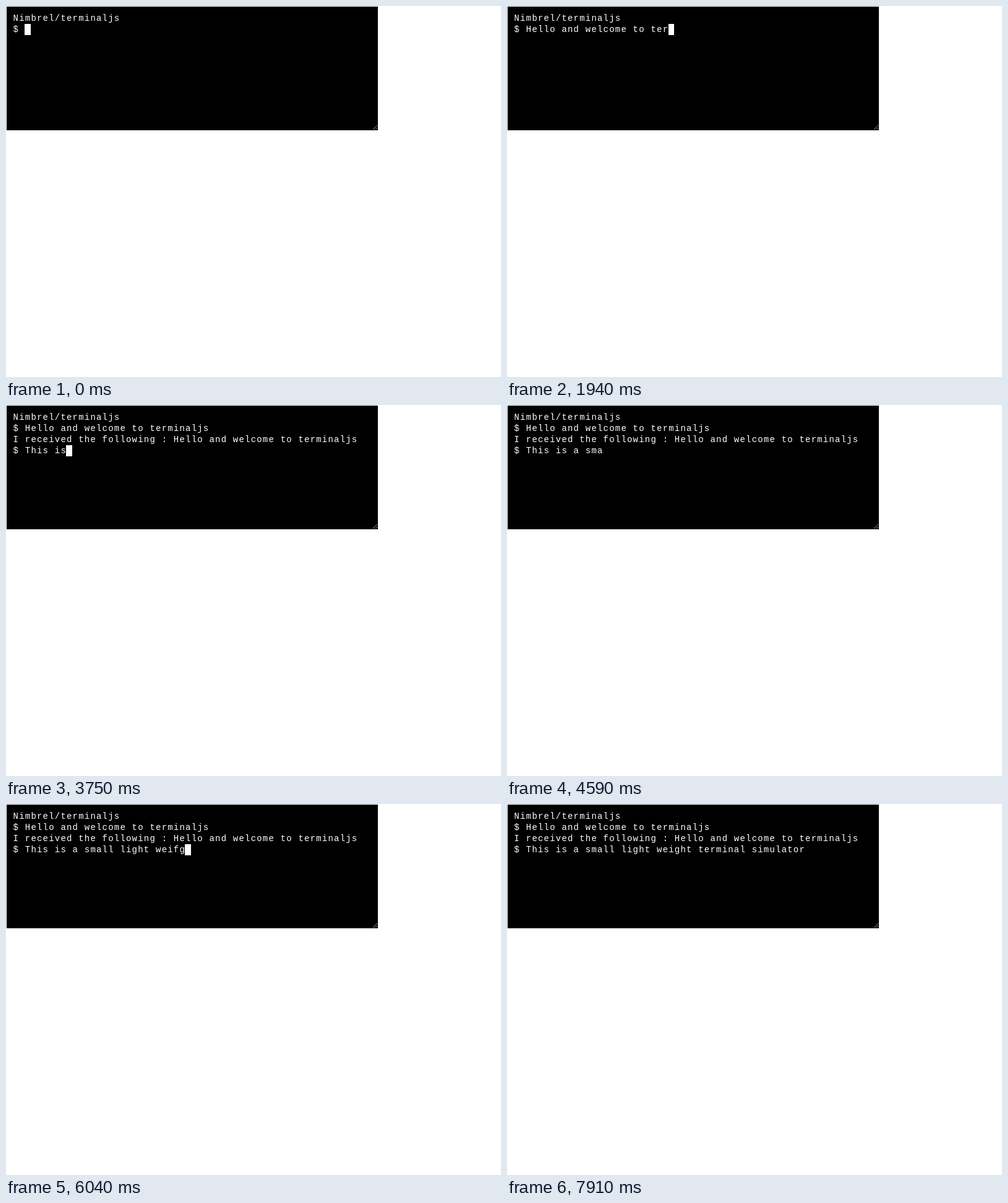
An HTML page with a canvas for the animation above (8 s loop, 800 by 600 pixels).

```html
<!DOCTYPE html>
<html lang="en">
<head>
<meta charset="utf-8">
<title>Terminal</title>
<style>
  html, body { margin: 0; width: 100%; height: 100%; overflow: hidden; background: #fff; }
  #terminal { position: absolute; left: 1px; top: 1px; width: 600px; height: 200px; background: #000; overflow: hidden; }
  /* Low, widely set letters on a 9.6px cell. */
  #text {
    position: absolute; left: 10.6px; top: 10px; margin: 0;
    font: 14px/18px "Liberation Mono", monospace; letter-spacing: 1.2px; color: #fff;
  }
  #cursor { position: absolute; width: 9.6px; height: 18px; background: #fff; }
  #grip { position: absolute; left: 0; top: 0; }
</style>
</head>
<body>
<div id="terminal">
  <pre id="text"></pre>
  <div id="cursor"></div>
  <canvas id="grip" width="600" height="200"></canvas>
</div>
<script>
const LOOP = 8000, ENTER = 2950;
const CELL = 9.6, LINE = 18, PAD = 10;
const text = document.getElementById('text');
const cursor = document.getElementById('cursor');

// Bursts of keys: start time, time per key, keys ("<" is backspace).
const bursts = [
  [310, 63.3, 'Hello and wel'],
  [1220, 50, 'come'],
  [1440, 1, ' '],
  [1570, 55, 'to '],
  [1790, 50, 'ter'],
  [2030, 52.5, 'minal'],
  [2320, 1, ' '],
  [2550, 45, '<js'],
  [3230, 56.6, 'This'],
  [3500, 1, ' '],
  [3650, 60, 'is '],
  [3900, 50, 'a '],
  [4430, 53.3, 'sma'],
  [4640, 60, 'll '],
  [4850, 45, 'light'],
  [5470, 1, ' '],
  [5615, 58.3, 'weif'],
  [5960, 40, 'gh<'],
  [6160, 50, '<<'],
  [6450, 70, 'ght'],
  [6620, 1, ' '],
  [6660, 65, 'ter'],
  [6855, 61, 'minal'],
  [7150, 1, ' '],
  [7330, 60, 'simulat'],
  [7870, 40, 'or']
];
const keys = bursts.flatMap(([start, step, chars]) =>
  [...chars].map((char, i) => ({ time: Math.floor(start + i * step), char })));

// The cursor starts visible and flips at each of these times.
const blinks = [
  120, 310, 500, 690, 943, 1170, 1370, 1510, 1730, 1940, 2160, 2380, 2550, 2780,
  2950, 3170, 3400, 3590, 3810, 3980, 4200, 4370, 4590, 4790, 5030, 5200, 5370,
  5560, 5790, 6040, 6160, 6380, 6590, 6790, 6980, 7190, 7390, 7570, 7830
];

function typed(from, to) {
  return keys
    .filter(key => key.time >= from && key.time <= to)
    .reduce((line, { char }) => char === '<' ? line.slice(0, -1) : line + char, '');
}

function draw(time) {
  const entered = time >= ENTER;
  const lines = ['Nimbrel/terminaljs'];
  if (entered) {
    const command = typed(0, ENTER - 1);
    lines.push('$ ' + command, 'I received the following : ' + command);
  }
  lines.push('$ ' + typed(entered ? ENTER : 0, time));

  const content = lines.join('\n');
  if (text.textContent !== content) text.textContent = content;

  const flips = blinks.filter(blink => blink <= time).length;
  cursor.style.visibility = flips % 2 ? 'hidden' : 'visible';
  cursor.style.left = PAD + lines.at(-1).length * CELL + 'px';
  cursor.style.top = PAD + (lines.length - 1) * LINE + 'px';
}

function drawGrip() {
  const ctx = document.getElementById('grip').getContext('2d');
  ctx.fillStyle = '#999';
  for (const [x, length] of [[592, 7], [596, 3]]) {
    for (let i = 0; i < length; i++) ctx.fillRect(x + i, 198 - i, 1, 1);
  }
}

const begin = performance.now();
function tick() {
  draw((performance.now() - begin) % LOOP);
  requestAnimationFrame(tick);
}
drawGrip();
draw(0);
requestAnimationFrame(tick);
</script>
</body>
</html>
```
